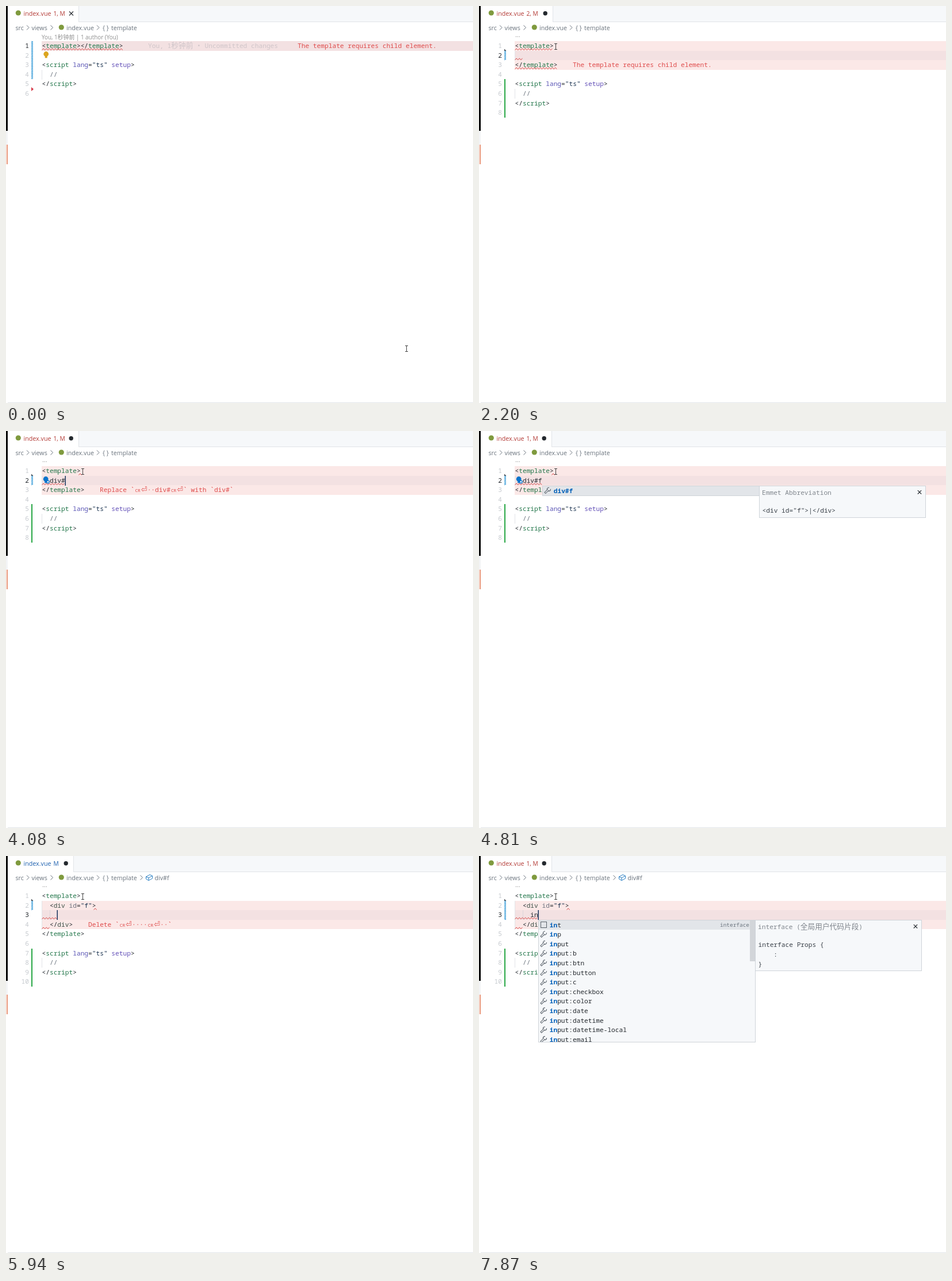
These frames come from a looping animation (812 by 690 pixels, 8 s). An HTML page with a canvas:

```html
<!DOCTYPE html>
<html lang="en">
<head>
<meta charset="utf-8">
<title>Editor</title>
<style>
html, body { margin: 0; width: 100%; height: 100%; overflow: hidden; background: #fff; }
canvas { display: block; }
</style>
</head>
<body>
<canvas id="stage" width="812" height="690"></canvas>
<script>
const c = document.getElementById('stage').getContext('2d');
const LOOP = 8000, X0 = 62.5, Y0 = 61, CH = 6.72, LH = 16.6;
const MONO = '"Noto Sans Mono", "Noto Sans CJK SC", monospace';
const SANS = '"Open Sans", "Noto Sans CJK SC", sans-serif';
const INK = '#24292e', RED = '#df4b4b', BLUE = '#005fb8';
const colX = col => X0 + col * CH;
const rowY = row => Math.round(Y0 + row * LH);

// ---- script of the session: every entry overrides the state before it ----
const SCRIPT = ['', '<script lang="ts" setup>', '  //', '<\/script>', ''];
const doc = (...inner) => ['<template>', ...inner, '</template>', ...SCRIPT];
const CHILD = 'The template requires child element.';
const replace = w => `Replace \`␍⏎··${w}␍⏎\` with \`${w}\``;
const wave = (row, from, to) => [row, from, to];

const emmet = (col, word, html, items = [word], match = word) =>
  ({ col, row: 2, items, match, title: 'Emmet Abbreviation', body: [html] });
const D_ITEMS = 'div data datalist dd del details dfn dialog dl dt doc doc4 document'.split(' ');
const IN_ITEMS = ['int', 'inp', 'input', ...'b btn button c checkbox color date datetime datetime-local email'
  .split(' ').map(s => 'input:' + s)];
const props = (col, match) => ({
  col, row: 3, items: IN_ITEMS, match, note: 'interface',
  title: 'interface (全局用户代码片段)', body: ['interface Props {', '    :', '}']
});
const typing = (word, more) => ({
  lines: doc('  ' + word), caret: [1, 2 + word.length], blink: true,
  waves: [wave(0, 9.5, 10.5), wave(1, 0, 2 + word.length)], ...more
});
const inner = (word, more) => ({
  lines: doc('  <div id="f">', '    ' + word, '  </div>'), caret: [2, 4 + word.length], blink: true, ...more
});
const innerWaves = n => [wave(1, 13.4, 14.4), wave(2, 0, n), wave(3, 0, 2)];

const STEPS = [
  [0, {
    lines: ['<template></template>', ...SCRIPT], current: 0, caret: [0, 10], blink: false,
    tab: '1, M', dirty: false, lens: 1, blame: true, red: [0, 1], waves: [wave(0, 0, 21)],
    msg: [0, 507, CHILD], hatch: [0, 4], added: null, bulb: 'gold', popup: null, crumb: false
  }],
  [870, { blink: true }],
  [1400, { blink: false }],
  [1470, { lens: 2 }],
  [1670, {
    lines: doc('  '), current: 1, caret: [1, 2], blink: true, dirty: true, blame: false, bulb: null,
    red: [0, 3], msg: [2, 163, CHILD], waves: [wave(0, 0, 10), wave(1, 0, 2), wave(2, 0, 11)]
  }],
  [1840, { hatch: [1, 2], added: [4, 8] }],
  [1930, { tab: '2, M' }],
  [2130, { lens: 0 }],
  [2200, { blink: false }],
  [2400, typing('d')],
  [2470, { tab: '1, M', msg: [2, 163, replace('d')] }],
  [2530, { popup: emmet(3, 'd', '<div>|</div>', D_ITEMS) }],
  [2670, typing('di')],
  [2770, { popup: emmet(4, 'di', '<di>|</di>'), msg: [2, 163, replace('di')] }],
  [2870, { bulb: 'blue' }],
  [3150, typing('div', { popup: emmet(5, 'div', '<div>|</div>') })],
  [3700, { blink: false }],
  [3950, typing('div#')],
  [4080, { popup: null, msg: [2, 163, replace('div#')] }],
  [4330, typing('div#f', { popup: emmet(7, 'div#f', '<div id="f">|</div>') })],
  [4810, { blink: false }],
  [5280, {
    lines: doc('  <div id="f"></div>'), caret: [1, 14], blink: true,
    popup: null, red: null, waves: [], msg: null
  }],
  [5360, { tab: 'M' }],
  [5550, { crumb: true, bulb: null }],
  [5750, inner('', { current: 2 })],
  [5830, { added: [6, 10] }],
  [5915, { red: [1, 4], waves: innerWaves(4), msg: [3, 143, 'Delete `␍⏎····␍⏎··`'] }],
  [6020, { hatch: [1, 3] }],
  [6080, { tab: '1, M' }],
  [6360, { blink: false }],
  [6870, { blink: true }],
  [7330, { blink: false }],
  [7660, inner('i', { waves: innerWaves(5) })],
  [7740, { popup: props(5, 'i') }],
  [7800, inner('in', { waves: innerWaves(6) })],
  [7870, { popup: props(6, 'in') }]
];
const stateAt = t => Object.assign({}, ...STEPS.filter(s => s[0] <= t).map(s => s[1]));

// ---- drawing helpers ----
function box(x, y, w, h, fill, border) {
  c.fillStyle = fill;
  c.fillRect(x, y, w, h);
  if (border) { c.strokeStyle = border; c.lineWidth = 1; c.strokeRect(x + .5, y + .5, w - 1, h - 1); }
}
function line(points, color, width = 1) {
  c.beginPath();
  points.forEach(([x, y]) => c.lineTo(x, y));
  c.strokeStyle = color;
  c.lineWidth = width;
  c.stroke();
}
function disc(x, y, r, fill) {
  c.beginPath();
  c.arc(x, y, r, 0, 7);
  c.fillStyle = fill;
  c.fill();
}
// Draws text and returns the x after it.
function text(s, x, y, color, font) {
  c.font = font;
  c.fillStyle = color;
  c.fillText(s, x, y);
  return x + c.measureText(s).width;
}
const ui = (s, x, y, color, size = 10.7) => text(s, x, y, color, `${size}px ${SANS}`);
function mono(s, x, y, color, weight = 400) {
  for (const run of s.match(/[\u4e00-\u9fff]+|␍|⏎|[^\u4e00-\u9fff␍⏎]+/g) || []) {
    if (run === '␍') x = text('CR', x + 1, y, color, `7.8px ${MONO}`) + 1;
    else if (run === '⏎') x = text(run, x, y, color, '13px "DejaVu Sans", sans-serif');
    else x = text(run, x, y, color, `${weight} ${run > '\u4e00' ? 12.7 : 11.2}px ${MONO}`);
  }
  return x;
}
const TOKENS = /"[^"]*"|\/\/|template|script|lang|setup|\bid\b|div#?f?|[<>\/=]+|\s+|\w+/g;
const COLORS = {
  template: '#22764a', script: '#22764a', lang: '#5a55b5', setup: '#6350b8',
  id: '#6f7480', div: '#3c5148', '//': '#6a737d'
};
function code(s, x, y) {
  for (const t of s.match(TOKENS) || [])
    x = mono(t, x, y, t[0] === '"' ? '#1b3350' : COLORS[t] || INK);
}
function cross(x, y, r = 3.5) {
  line([[x - r, y - r], [x + r, y + r]], INK, 1.1);
  line([[x - r, y + r], [x + r, y - r]], INK, 1.1);
}
const chevron = x => line([[x - 2, 33.5], [x + 2, 37.5], [x - 2, 41.5]], '#6a737d');

function squiggle([row, from, to]) {
  const y = rowY(row) + 14.3, end = colX(to), pts = [];
  for (let x = colX(from), i = 0; x <= end; x += 2.6, i++) pts.push([x, y + (i % 2 ? -1.2 : 1.2)]);
  line(pts, '#d3302f', .9);
}
function bulb(kind) {
  const color = kind === 'gold' ? '#dba520' : '#0a74cc';
  const x = kind === 'gold' ? 69.7 : 69.2;
  disc(x, 83.5, 4.4, color);
  box(x - 2, 87, 4, 3.3, color);
  if (kind === 'gold') return;
  disc(73, 88.4, 2.8, color);
  disc(73, 88.4, 1.4, '#fff');
}
function wrench(x, y, bg) {
  line([[x - 4.5, y + 4.5], [x + 1.5, y - 1.5]], '#586069', 3.6);
  c.beginPath();
  c.arc(x + 2.4, y - 2.2, 3, -.2, 4.9);
  c.strokeStyle = '#586069';
  c.lineWidth = 1.1;
  c.stroke();
  line([[x - 3.8, y + 3.8], [x + 2.2, y - 2.2]], bg, 1.6);
  line([[x + 2.4, y - 2.2], [x + 5, y - 4.8]], bg, 1.8);
}
function ibeam(x, y) {
  line([[x, y - 5], [x, y + 5]], '#444');
  for (const s of [-5, 5]) line([[x - 2.5, y + s], [x + 2.5, y + s]], '#444');
}

function popup(p) {
  const x = Math.round(colX(p.col)), y = Math.ceil(Y0 + p.row * LH);
  const border = '#cfd4d9', bg = '#f6f8fa', selected = '#e2e5e9';
  const h = Math.round(Math.min(p.items.length * LH + 1, 213));
  const detailH = Math.round((p.body.length + 2) * LH + 6), dx = x + 377;
  box(x, y, 378, h, bg, border);
  c.save();
  c.beginPath();
  c.rect(x + 1, y + 1, 376, h - 2);
  c.clip();
  box(x, y, 378, 17, selected);
  p.items.forEach((item, i) => {
    const cy = y + 8.6 + i * LH;
    if (p.note && !i) {
      c.strokeStyle = '#586069';
      c.lineWidth = 1;
      c.strokeRect(x + 4.5, y + 3.5, 10, 10);
    } else wrench(x + 9, cy, i ? bg : selected);
    const n = item.startsWith(p.match) ? p.match.length : 1;
    mono(item.slice(n), mono(item.slice(0, n), x + 19.7, cy + 4, BLUE, 700), cy + 4, INK);
  });
  if (p.note) text(p.note, x + 316, y + 12.4, '#6a737d', `9.45px ${MONO}`);
  if (h > 200) box(x + 368, y + 1, 9, 71, '#d2d5d9');
  c.restore();
  box(dx, y, 290, detailH, bg, border);
  mono(p.title, dx + 5, y + 15.5, '#80868d');
  p.body.forEach((s, i) => mono(s, dx + 5.5, y + 47 + i * 16.8, '#3a4149'));
  cross(x + 656, y + 11.3, 3.2);
}

function header(s) {
  const clean = s.tab === 'M', color = clean ? '#1b5fae' : '#b33a35';
  const edge = clean ? 117 : s.tab[0] === '2' ? 128 : 126;
  box(3, 0, 809, 28, '#f6f8fa');
  box(3, 27, 809, 1, '#e1e4e8');
  box(3, 0, edge - 3, 28, '#fff');
  box(edge, 0, 1, 28, '#e1e4e8');
  disc(21.3, 12, 4.6, '#7f9a3e');
  ui('index.vue', 30.5, 17, color);
  ui(s.tab, 82.5, 16.5, color, 10.2);
  if (s.dirty) disc(edge - 12.8, 12.7, 3.7, INK);
  else cross(113.5, 13);

  const gray = '#6a737d';
  ui('src', 16.5, 42, gray);
  chevron(38);
  ui('views', 44.5, 42, gray);
  chevron(79.5);
  disc(96.3, 37, 4.6, '#7f9a3e');
  ui('index.vue', 105, 42, gray);
  chevron(160);
  ui('{ }', 168, 41.5, gray, 10.5);
  ui('template', 183, 42, gray);
  if (s.crumb) {
    const blue = '#2a7fc4';
    chevron(235.5);
    line([[243.5, 36], [250, 32.5], [254.5, 34.5], [254.5, 39], [248, 42.5], [243.5, 40], [243.5, 36],
      [248, 38], [254.5, 34.5]], blue);
    line([[248, 38], [248, 42.5]], blue);
    ui('div#f', 258.5, 42, gray);
  }
}

function gutter(s) {
  c.textAlign = 'right';
  s.lines.forEach((_, i) =>
    mono(String(i + 1), 40, rowY(i) + 12, i === s.current ? INK : '#c6cacf'));
  c.textAlign = 'left';
  const top = rowY(s.hatch[0]), bottom = rowY(s.hatch[1]);
  c.save();
  c.beginPath();
  c.rect(44, top, 3, bottom - top);
  c.clip();
  for (let y = top - 4; y < bottom + 4; y += 2.6) line([[43, y], [48, y + 4]], '#2090d3', 1.2);
  c.restore();
  c.beginPath();
  if (s.added) {
    box(44, rowY(s.added[0]), 2, rowY(s.added[1]) - rowY(s.added[0]), '#28a745');
    c.moveTo(44, 74.5); c.lineTo(47.5, 78); c.lineTo(44, 78);
    c.fillStyle = '#444d56';
  } else {
    c.moveTo(44, 141); c.lineTo(48, 144.5); c.lineTo(44, 148);
    c.fillStyle = '#d73a49';
  }
  c.fill();
}

function editor(s) {
  const band = (row, fill) => box(62, rowY(row), 750, rowY(row + 1) - rowY(row), fill);
  band(s.current, '#f6f8fa');
  if (s.red) for (let r = s.red[0]; r < s.red[1]; r++) band(r, r === s.current ? '#f3e1e2' : '#fbe8e7');
  if (s.lens) ui(`You, ${s.lens}秒钟前 | 1 author (You)`, 62, 58, '#8f8f8f', 9.9);
  else ui('...', 63, 54, '#8f8f8f');
  gutter(s);
  s.lines.forEach((l, i) => {
    if (l.startsWith('  ')) box(62, rowY(i), 1, 17, '#e3e4e8');
    if (l.startsWith('    ')) box(76, rowY(i), 1, 17, '#dcd5d9');
    code(l, X0, rowY(i) + 12);
  });
  if (s.blame) mono('You, 1秒钟前 • Uncommitted changes', 247, 73, '#cfc5c9');
  if (s.msg) mono(s.msg[2], s.msg[1], rowY(s.msg[0]) + 12, RED);
  s.waves.forEach(squiggle);
  if (s.bulb) bulb(s.bulb);
  if (s.blink) box(Math.round(colX(s.caret[1])) - .5, rowY(s.caret[0]), 1.5, 17, '#17335c');
}

function draw(t) {
  const s = stateAt(t);
  box(0, 0, 812, 690, '#fff');
  header(s);
  editor(s);
  if (s.popup) popup(s.popup);
  box(0, 0, 3, 217, '#000');
  box(0, 217, 3, 24, '#f3f4f6');
  box(1, 241, 2, 34, '#e9977a');
  box(3, 689, 809, 1, '#e1e4e8');
  // The pointer travels in nine steps, slow at both ends.
  const k = Math.max(0, Math.min(9, Math.floor((t - 70) / 75) + 1)) / 9;
  const e = k * k * (3 - 2 * k);
  ibeam(696.5 - 563 * e, 595.5 - 525 * e);
}

const start = performance.now();
function tick() {
  draw((performance.now() - start) % LOOP);
  requestAnimationFrame(tick);
}
tick();
</script>
</body>
</html>
```
